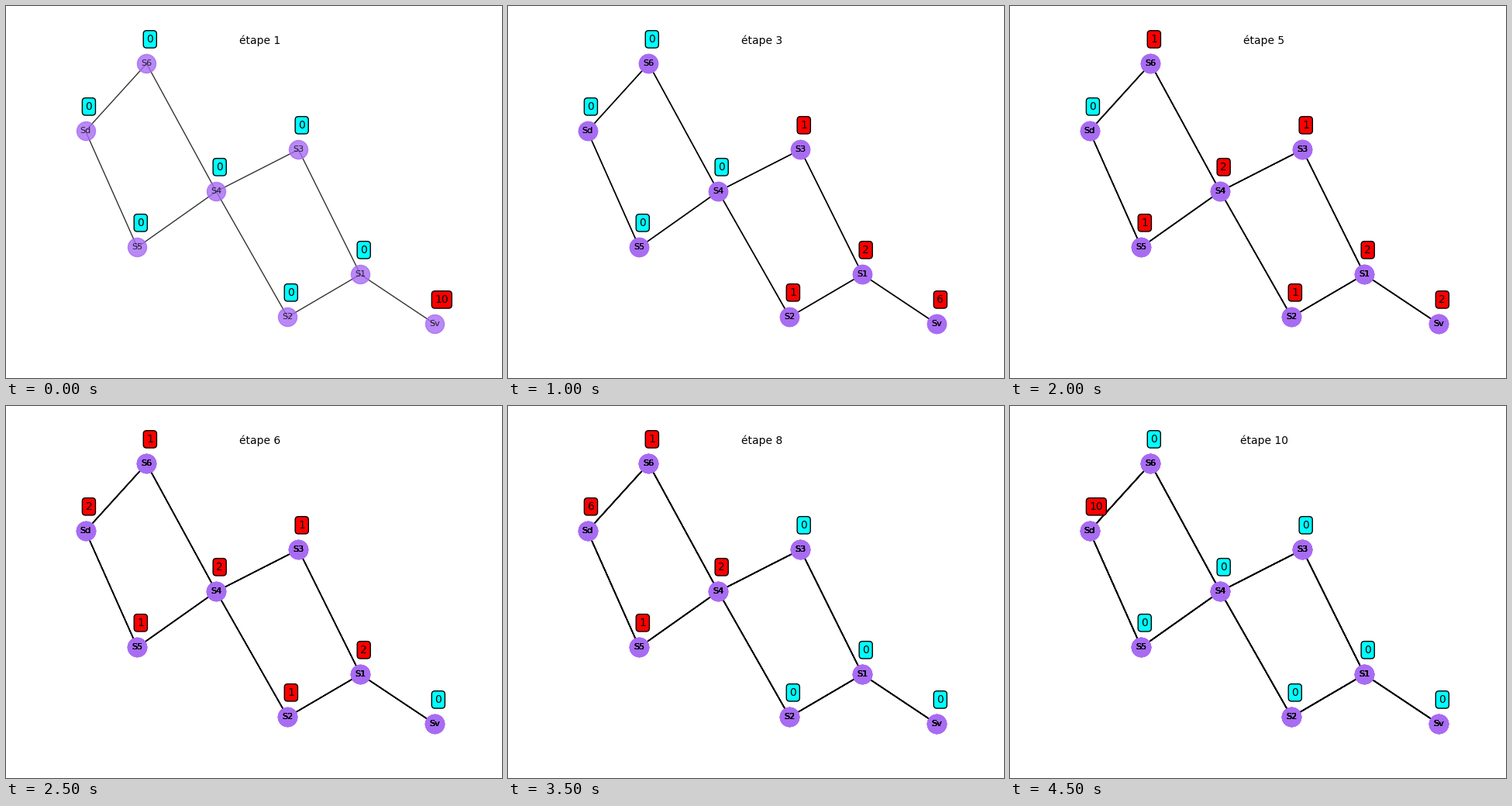
Recreate the animation shown at these times as a matplotlib script. Size 640 by 480 pixels, loop 5 s.

```python
import matplotlib.pyplot as plt
from matplotlib.animation import FuncAnimation
from matplotlib.collections import LineCollection

STEPS = 10
TOTAL, RATE = 10, 2
PURPLE = "#A86CF3"

# Node centres in pixels, measured from the top left corner
POS = {
    "Sd": (102.55, 161.3), "S6": (181.4, 74.4), "S5": (169.4, 311.3),
    "S4": (271.3, 239.3), "S3": (377.3, 185.3), "S2": (363.4, 401.3),
    "S1": (457.3, 346.3), "Sv": (553.45, 410.4),
}
EDGES = ["Sd S6", "Sd S5", "S6 S4", "S5 S4", "S4 S3", "S4 S2",
         "S3 S1", "S2 S1", "S1 Sv"]
# Arrival delay and amount carried by each relay node
RELAY = {"S1": (1, 2), "S2": (2, 1), "S3": (2, 1),
         "S4": (3, 2), "S5": (4, 1), "S6": (4, 1)}

plt.rcParams["font.family"] = "DejaVu Sans"
fig, ax = plt.subplots(figsize=(6.4, 4.8), dpi=100)
ax.set_axis_off()
ax.set_xlim(80, 576)
ax.set_ylim(427.2, 57.6)
title = ax.set_title("", fontsize=10)


def amount(name, step):
    if name == "Sv":
        return max(TOTAL - RATE * step, 0)
    if name == "Sd":
        return max(RATE * (step - 4), 0)
    delay, share = RELAY[name]
    return share if 0 <= step - delay < TOTAL // RATE else 0


def draw_graph():
    """One translucent copy of the graph; copies pile up step by step."""
    lines = LineCollection([[POS[n] for n in e.split()] for e in EDGES],
                           colors="black", linewidths=1, alpha=0.8, zorder=1)
    ax.add_collection(lines, autolim=False)
    xs, ys = zip(*POS.values())
    dots = ax.scatter(xs, ys, s=300, c=PURPLE, alpha=0.8, zorder=2)
    names = [ax.text(x, y, n, size=8, alpha=0.8, ha="center", va="center")
             for n, (x, y) in POS.items()]
    return [lines, dots, *names]


layers = [draw_graph() for _ in range(STEPS)]
tags = {n: ax.text(x, y - 27.5, "0", size=10,
                   bbox=dict(boxstyle="round", facecolor="cyan"))
        for n, (x, y) in POS.items()}
ax.set_xlim(80, 576)
ax.set_ylim(427.2, 57.6)


def update(step):
    title.set_text(f"étape {step + 1}")
    for i, layer in enumerate(layers):
        for artist in layer:
            artist.set_visible(i <= step)
    for name, tag in tags.items():
        value = amount(name, step)
        tag.set_text(str(value))
        tag.get_bbox_patch().set_facecolor("red" if value else "cyan")
    return []


anim = FuncAnimation(fig, update, frames=STEPS, interval=500,
                     init_func=lambda: update(0), repeat=True, repeat_delay=0)
plt.show()
```
